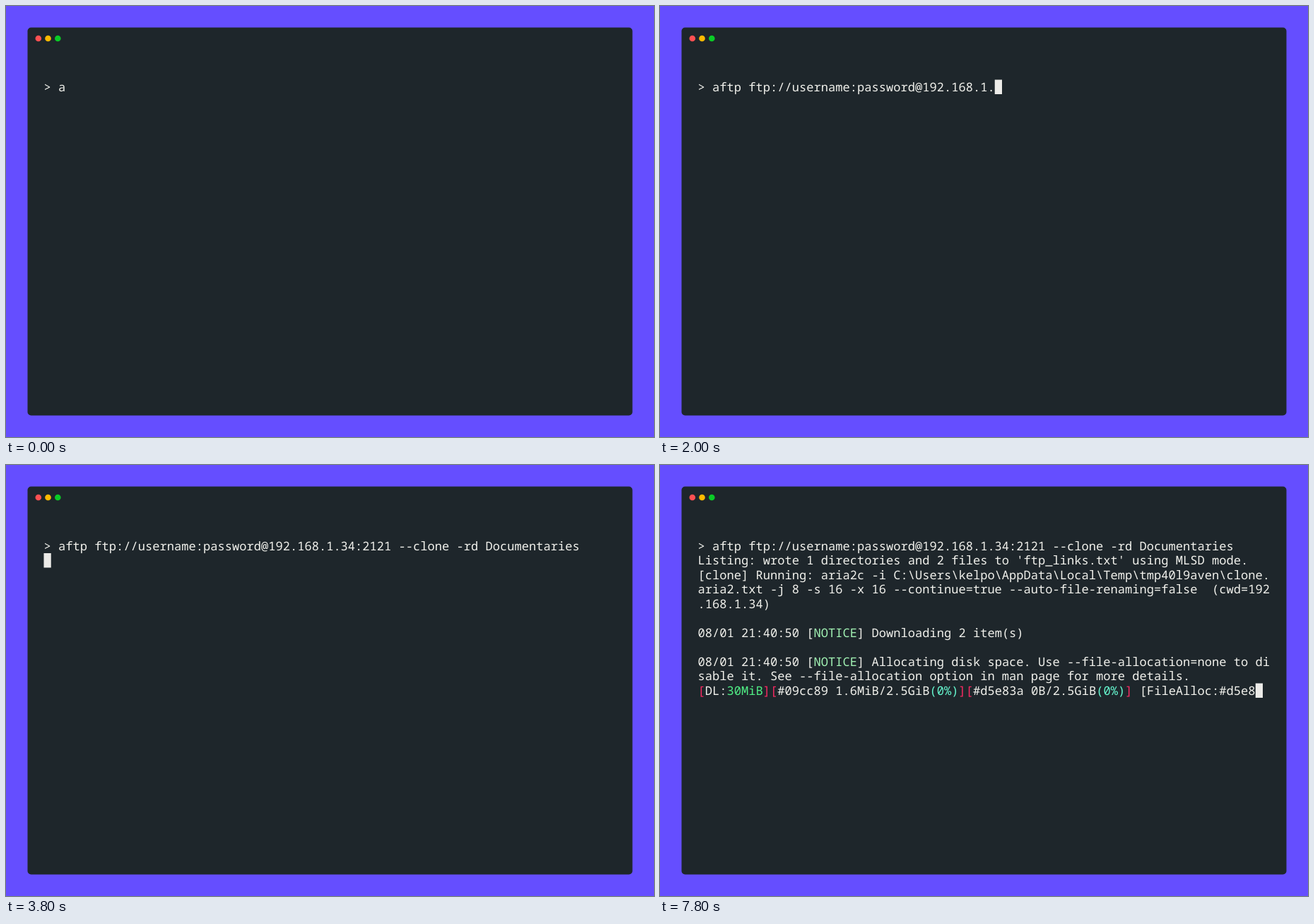
An HTML page that plays this animation: 917 px wide and 611 px high, repeating every 8000 ms.

```html
<!DOCTYPE html>
<html lang="en">
<head>
<meta charset="utf-8">
<title>Terminal session</title>
<style>
html, body { margin: 0; width: 100%; height: 100%; overflow: hidden; background: #654eff; }
svg { display: block; width: 917px; height: 611px; }
text {
  font: 17.083px "Noto Sans Mono", "DejaVu Sans Mono", monospace;
  fill: #f1f1ec;
  white-space: pre;
  text-rendering: geometricPrecision;
  font-variant-ligatures: none;
}
.notice { fill: #a2f3b4; }
.speed { fill: #50ee85; }
.percent { fill: #66f7cf; }
.bracket { fill: #f92a62; }
</style>
</head>
<body>
<svg viewBox="0 0 917 611">
  <rect width="917" height="611" fill="#654eff"/>
  <rect x="30.5" y="30.5" width="856" height="550" rx="5" fill="#1e262b"/>
  <circle cx="45.8" cy="46" r="4.3" fill="#ff5052"/>
  <circle cx="59.5" cy="46" r="4.3" fill="#ffba00"/>
  <circle cx="73.3" cy="46" r="4.3" fill="#0acb26"/>
  <g id="rows"></g>
  <rect id="cursor" width="10.25" height="20.5" fill="#ecebe8"/>
</svg>
<script>
const LOOP = 8000, LEFT = 53.5, TOP = 104.5, CELL = 10.25, LINE = 20.5, BASELINE = 16;

const paint = (cls, text) => `<tspan class="${cls}">${text}</tspan>`;
const bracket = text => paint("bracket", text);
const item = (id, done) => `#${id} ${done}/2.5GiB${paint("percent", "(0%)")}`;
const status = (speed, done, alloc) =>
  bracket("[") + "DL:" + paint("speed", speed) + bracket("][") +
  item("09cc89", done) + bracket("][") + item("d5e83a", "0B") + bracket("]") +
  " [FileAlloc:" + alloc;

const notice = `08/01 21:40:50 [${paint("notice", "NOTICE")}] `;
const command = "> aftp ftp://username:password@192.168.1.34:2121 --clone -rd Documentaries";
const output = [
  "Listing: wrote 1 directories and 2 files to 'ftp_links.txt' using MLSD mode.",
  "[clone] Running: aria2c -i C:\\Users\\kelpo\\AppData\\Local\\Temp\\tmp40l9aven\\clone.",
  "aria2.txt -j 8 -s 16 -x 16 --continue=true --auto-file-renaming=false  (cwd=192",
  ".168.1.34)",
  "",
  notice + "Downloading 2 item(s)",
  "",
  notice + "Allocating disk space. Use --file-allocation=none to di",
  "sable it. See --file-allocation option in man page for more details."
];
const STATUS_ROW = output.length + 1, STATUS_COLS = 77;

// Each stage: start time, number of output rows shown.
const stages = [[0, 0], [4120, 4], [4160, 6], [4200, 9]];
// Each update: start time, time the cursor blinks off, status line.
const updates = [
  [4200, 4720, ""],
  [5080, 5640, status("0B", "0B", "#09cc89 765M")],
  [5960, 6520, status("0B", "0B", "#09cc89 1.5G")],
  [6880, 7440, status("0B", "0B", "#09cc89 2.2G")],
  [7760, LOOP, status("30MiB", "1.6MiB", "#d5e8")]
];

const group = document.getElementById("rows");
const cursor = document.getElementById("cursor");
const rows = Array.from({ length: STATUS_ROW + 1 }, (_, i) => {
  const row = document.createElementNS("http://www.w3.org/2000/svg", "text");
  row.setAttribute("x", LEFT);
  row.setAttribute("y", TOP + i * LINE + BASELINE);
  group.append(row);
  return row;
});

function setRow(i, markup) {
  if (rows[i].markup === markup) return;
  rows[i].markup = markup;
  rows[i].innerHTML = markup;
}

function setCursor(col, row, visible) {
  cursor.setAttribute("x", LEFT + col * CELL);
  cursor.setAttribute("y", TOP + row * LINE);
  cursor.setAttribute("visibility", visible ? "visible" : "hidden");
}

const latest = (list, t) => list.filter(entry => t >= entry[0]).pop();

function render(t) {
  // Three characters are typed every 160 ms, on a 40 ms clock.
  const tick = Math.floor(t / 40);
  const typed = tick < 1 ? 3 : Math.min(command.length, Math.floor(4 + tick * 0.75));
  setRow(0, command.slice(0, typed).replace(">", "&gt;"));

  const shown = latest(stages, t)[1];
  output.forEach((line, i) => setRow(i + 1, i < shown ? line : ""));

  const update = latest(updates, t);
  setRow(STATUS_ROW, update ? update[2] : "");

  if (update) setCursor(update[2] ? STATUS_COLS : 0, STATUS_ROW, t < update[1]);
  else if (t >= 3800) setCursor(0, shown + 1, true);
  else setCursor(typed, 0, tick >= 1);
}

const start = performance.now();
function frame() {
  render((performance.now() - start) % LOOP);
  requestAnimationFrame(frame);
}
render(0);
requestAnimationFrame(frame);
</script>
</body>
</html>
```
